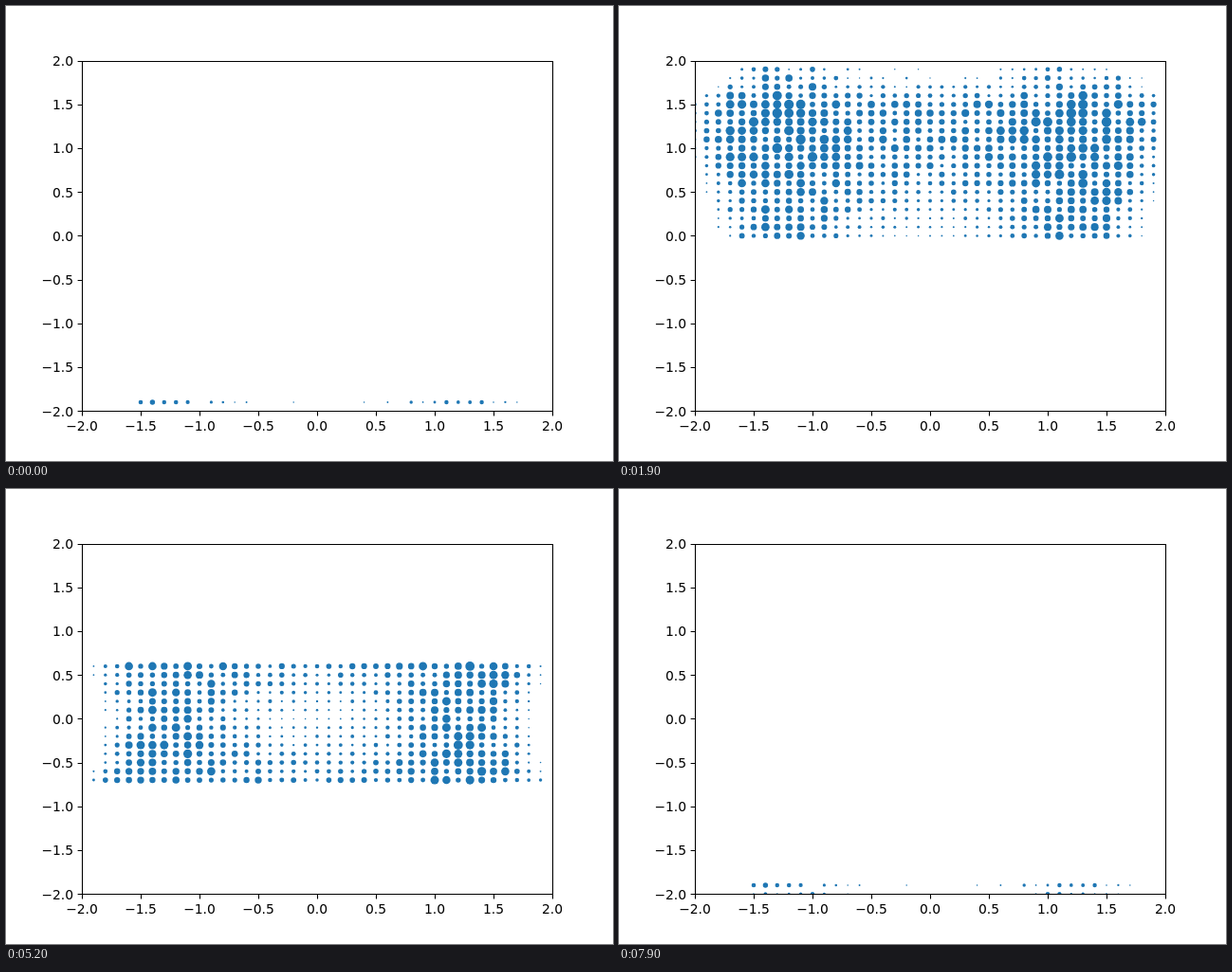
An HTML page for the animation above (8 s loop, 640 px wide and 480 px high).

```html
<!DOCTYPE html>
<html lang="en">
<head>
<meta charset="utf-8">
<title>Scatter sweep</title>
<style>
  html, body { margin: 0; width: 100%; height: 100%; overflow: hidden; background: #fff; }
  svg { display: block; width: 640px; height: 480px; }
  text { font: 13.89px "DejaVu Sans", sans-serif; }
  .axes { fill: none; stroke: #000; stroke-width: 1.1; }
  .dots { fill: #1f77b4; }
</style>
</head>
<body>
<svg viewBox="0 0 640 480">
  <clipPath id="plot"><rect x="81" y="58" width="495" height="369"/></clipPath>
  <g class="dots" clip-path="url(#plot)"></g>
  <path class="axes"/>
  <g class="labels"></g>
</svg>
<script>
const N = 40, STEP = 100, LOOP = 8000;
const px = x => 328 + 124 * x;
const py = y => 242.4 - 92.4 * y;
const clamp = v => Math.max(0, Math.min(1, v));
const $ = s => document.querySelector(s);

function add(parent, tag, attrs, text = "") {
  const el = document.createElementNS("http://www.w3.org/2000/svg", tag);
  for (const k in attrs) el.setAttribute(k, attrs[k]);
  el.textContent = text;
  return parent.appendChild(el);
}

function drawAxes() {
  let d = "M80.5 58.5H576.5V427.5H80.5Z";
  for (let i = 0; i <= 8; i++) {
    const v = i / 2 - 2;
    const x = Math.round(px(v)) + 0.5, y = Math.round(py(v)) + 0.5;
    const label = (v < 0 ? "\u2212" : "") + Math.abs(v).toFixed(1);
    d += `M${x} 427.5v4.9M80.5 ${y}h-4.9`;
    add($(".labels"), "text", { x: px(v), y: 448, "text-anchor": "middle" }, label);
    add($(".labels"), "text", { x: 71.1, y: Math.ceil(py(v) + 4.9), "text-anchor": "end" }, label);
  }
  $(".axes").setAttribute("d", d);
}

// Seeded value in 0..1 for one grid cell
function noise(col, row) {
  const s = Math.sin(col * 12.9898 + row * 78.233) * 43758.5453;
  return s - Math.floor(s);
}

// Two lobes around x = ±1.25, thin at the origin, ragged towards the rim
function radius(col, row) {
  const x = Math.abs(col / 10 - 2), y = Math.abs(row / 10 - 2);
  const rim = clamp((y - 1.5) * 2);
  const core = (0.9 + 2 * clamp(y * 1.1)) * (1 - 0.7 * rim) ** 2;
  const peak = (3.5 + 0.5 * clamp(y)) * (1 - 0.4 * rim);
  const width = 0.55 + 0.1 * clamp(y) - 0.25 * rim;
  const lobe = Math.exp(-(((x - 1.25) / width) ** 2));
  const edge = 1.73 + 0.22 * clamp(y * y) - 0.4 * rim;
  const tail = clamp(0.6 + (edge - x) * 2.5);
  const vary = 0.7 - 0.5 * rim + (0.65 + 0.5 * rim) * noise(col, row);
  const r = (core + (peak - core) * lobe) * tail * vary;
  return r < 0.7 ? 0 : r;
}

function makeRow(row) {
  const g = add($(".dots"), "g", {});
  for (let col = 0; col < N; col++) {
    const r = radius(col, row);
    if (r) add(g, "circle", { cx: px(col / 10 - 2), cy: py(row / 10 - 2), r: r.toFixed(2) });
  }
  return g;
}

drawAxes();
const rows = Array.from({ length: N }, (_, i) => makeRow(i));

// The band rises one row per step and grows as it goes; each pass adds a row
function draw() {
  const n = Math.floor((performance.now() % LOOP) / STEP) + 1;
  const first = n % N, last = 2 * first - 1 + Math.floor(n / N);
  rows.forEach((g, i) => {
    g.style.display = i >= first && i <= last ? "" : "none";
  });
  requestAnimationFrame(draw);
}
draw();
</script>
</body>
</html>
```
